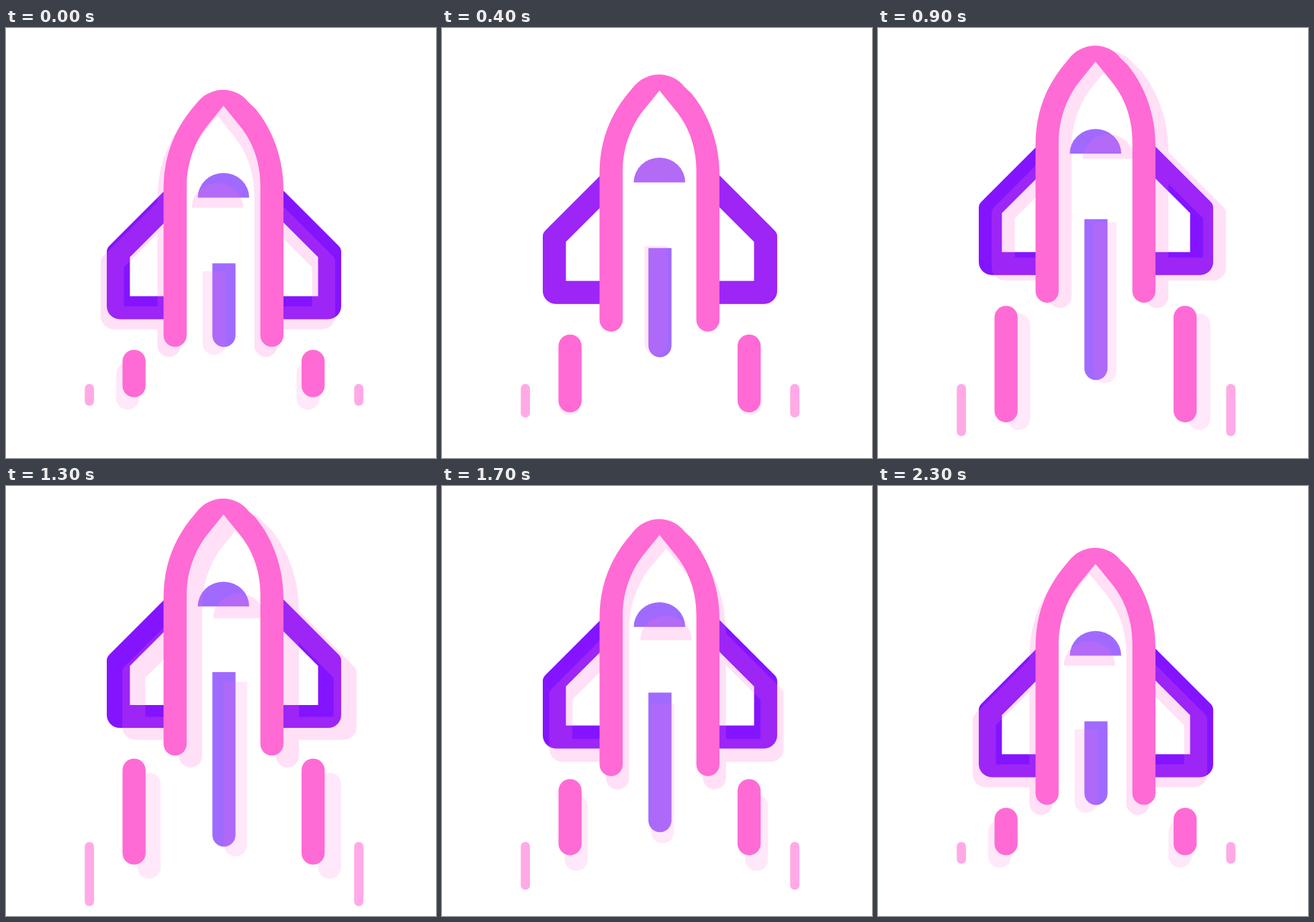
Recreate the animation shown at these times as an HTML page. Size 640 px wide and 640 px high, loop 2.4 s.

```html
<!DOCTYPE html>
<html lang="en">
<head>
<meta charset="utf-8">
<title>Rocket</title>
<style>
  html, body { margin: 0; width: 100%; height: 100%; overflow: hidden; background: #fff; }
  svg { display: block; width: 100%; height: 100%; }
</style>
</head>
<body>
<svg viewBox="0 0 640 640">
  <defs>
    <path id="wing" d="M235 243L154 324Q150 328 150 333V414A19.5 19.5 0 0 0 169.5 433.4H252V399.2H184.4V341L235 290.5L252 273V226Z"/>
    <g id="wings">
      <use href="#wing"/>
      <use href="#wing" transform="translate(648.9) scale(-1 1)"/>
    </g>
    <path id="dome" d="M285.4 252.5A38.3 36.7 0 0 1 362 252.5Z"/>
    <path id="hull" d="M234.5 457.3V240C234.5 191 250 150 283 112.8C303 85.4 342 85.4 361 110.5L372 121C398 153 413 196 413 240V457.3A17.2 17.2 0 0 1 378.6 457.3V235C378.6 203 369 172 349 147L323.7 115.7L300 145C280 170 268.9 203 268.9 235V457.3A17.2 17.2 0 0 1 234.5 457.3Z"/>
  </defs>
  <g fill="#ffaae6">
    <rect class="spark" x="117.2" y="529.8" width="13.8" rx="6.9"/>
    <rect class="spark" x="518.2" y="529.8" width="13.8" rx="6.9"/>
  </g>
  <g id="rocket">
    <use href="#wings" fill="#8414ff"/>
    <use href="#dome" fill="#a06aff"/>
    <path class="bar" fill="#a06aff"/>
    <g fill="#ff6bd5">
      <use href="#hull"/>
      <rect class="trail" x="173.4" y="479" width="34.4" rx="17.2"/>
      <rect class="trail" x="439.9" y="479" width="34.4" rx="17.2"/>
    </g>
  </g>
  <g id="shade" fill="#ff6bd5">
    <g opacity=".21">
      <use href="#wings"/>
      <use href="#dome"/>
      <use href="#hull"/>
    </g>
    <g opacity=".155">
      <path class="bar" transform="translate(-5.8 -3.3)"/>
      <rect class="trail" x="172.9" y="482.5" width="34.4" rx="17.2"/>
      <rect class="trail" x="441.4" y="482.5" width="34.4" rx="17.2"/>
    </g>
  </g>
</svg>
<script>
const LOOP = 2400, STEP = 100, END = LOOP - STEP;

// Goes from 0 to 1 at peakTime and back to 0 at END.
// lead < 1 quickens the start of the rise; soft blends linear (0) with sine (1).
function swing(t, peakTime, lead = 1, soft = 1) {
  const x = t < peakTime ? (t / peakTime) ** lead : (END - t) / (END - peakTime);
  const sine = (1 - Math.cos(Math.PI * x)) / 2;
  return x + (sine - x) * soft;
}

const byId = id => document.getElementById(id);
const setAll = (selector, name, value) =>
  document.querySelectorAll(selector).forEach(el => el.setAttribute(name, value));
const move = (id, x, y) => byId(id).setAttribute("transform", `translate(${x} ${y})`);

function draw(ms) {
  const t = Math.floor((ms % LOOP) / STEP) * STEP;
  move("rocket", 0, -74.8 * swing(t, 1200, 0.9));
  move("shade", -9 + 32.6 * swing(t, 1200, 0.95), 15 - 75.8 * swing(t, 1100, 0.69));
  const barEnd = 457.6 + 136 * swing(t, 1250, 0.91);
  setAll(".bar", "d", `M307.2 350.2H341.6V${barEnd}a17.2 17.2 0 0 1 -34.4 0Z`);
  setAll(".trail", "height", 70.6 + 103.5 * swing(t, 950, 0.9));
  setAll(".spark", "height", 32.4 + 63 * swing(t, 1300, 1, 0.3));
}

let start;
function tick(now) {
  start ??= now;
  draw(now - start);
  requestAnimationFrame(tick);
}
draw(0);
requestAnimationFrame(tick);
</script>
</body>
</html>
```
